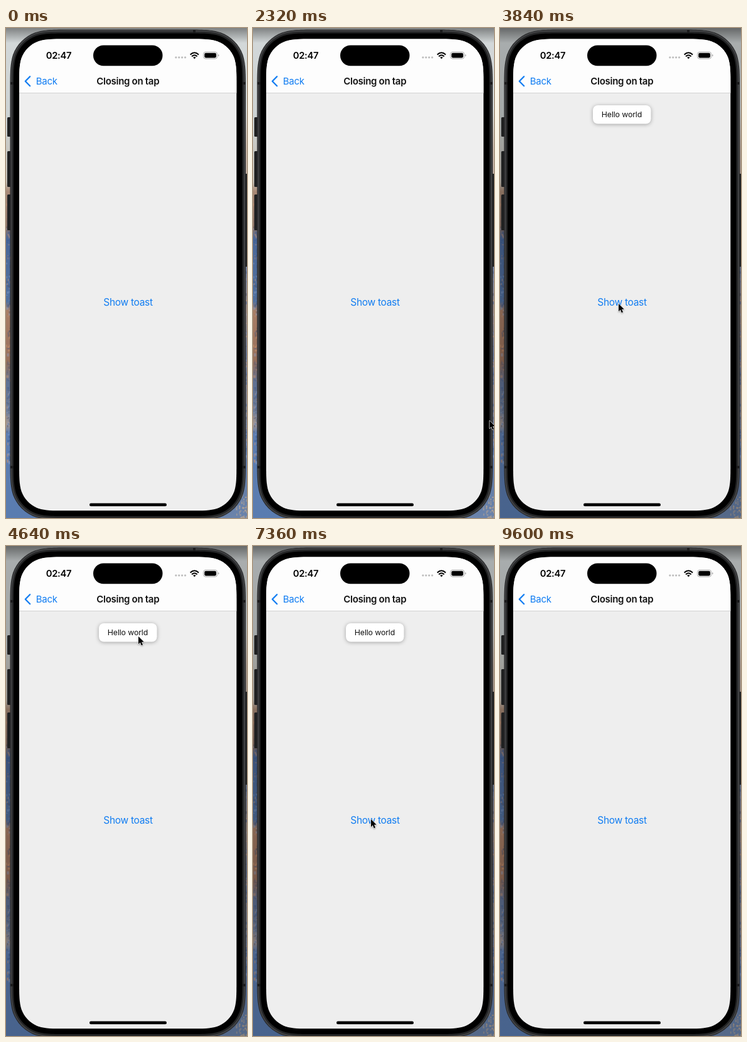
An HTML page with a canvas for the animation above (9.68 s loop, 384 by 780 pixels).

```html
<!DOCTYPE html>
<html lang="en">
<head>
<meta charset="utf-8">
<title>Closing on tap</title>
<style>
  html, body { margin: 0; width: 100%; height: 100%; overflow: hidden; background: #5f7fb0; }
  canvas, svg { position: absolute; left: 0; top: 0; display: block; }
  text { font-family: Inter, "Liberation Sans", sans-serif; font-size: 15px; letter-spacing: -.02em; }
  .bold { font-weight: 600; }
  .link { fill: #117df2; }
  .mid { text-anchor: middle; }
  #toast rect { filter: drop-shadow(0 1px 3px rgba(0, 0, 0, .32)); }
  #cursor { filter: drop-shadow(0 1px 1px rgba(0, 0, 0, .35)); }
</style>
</head>
<body>
<canvas id="wall" width="384" height="780"></canvas>
<svg width="384" height="780" viewBox="0 0 384 780">
  <defs>
    <clipPath id="screen"><path id="glass"/></clipPath>
    <linearGradient id="topShade" x2="0" y2="1">
      <stop stop-color="#000" stop-opacity=".4"/>
      <stop offset="1" stop-color="#000" stop-opacity="0"/>
    </linearGradient>
  </defs>

  <rect width="384" height="24" fill="url(#topShade)"/>
  <rect id="focusShade" width="384" height="780" fill="#000" opacity="0"/>

  <!-- phone body -->
  <g fill="#202122">
    <rect x="2" y="142" width="8" height="31" rx="1.5"/>
    <rect x="2" y="196" width="8" height="57" rx="1.5"/>
    <rect x="2" y="265" width="8" height="57" rx="1.5"/>
    <rect x="381" y="232" width="5" height="148" rx="1.5"/>
  </g>
  <path id="body" fill="#242526"/>
  <path id="rim" fill="none" stroke="#424345" stroke-width="2"/>
  <path id="bezel"/>
  <path d="M7 86h5v4h-5zM377 86h5v4h-5zM7 697h5v4h-5zM377 697h5v4h-5zM298 3h4v5h-4z" fill="#1b1b1c"/>

  <g clip-path="url(#screen)">
    <rect x="21" y="17" width="347" height="752" fill="#eee"/>
    <rect x="21" y="17" width="347" height="86" fill="#fdfdfd"/>
    <rect x="21" y="103" width="347" height="1" fill="#d2d2d2"/>

    <path d="M38.2 77.2 30.8 84.7l7.4 7.5" fill="none" stroke="#117df2" stroke-width="2.3" stroke-linecap="round" stroke-linejoin="round"/>
    <text class="link" x="47.8" y="90">Back</text>
    <text class="bold mid" x="194.3" y="89.9" fill="#111">Closing on tap</text>
    <text class="link mid" x="194.5" y="441.8" style="font-size:15.5px">Show toast</text>

    <text class="bold mid" x="84" y="49" style="font-size:14.8px">02:47</text>
    <g fill="#bdbdbd">
      <circle cx="270.8" cy="46.8" r="1.6"/><circle cx="275.7" cy="46.8" r="1.6"/>
      <circle cx="280.6" cy="46.8" r="1.6"/><circle cx="285.5" cy="46.8" r="1.6"/>
    </g>
    <g fill="none" stroke="#000" stroke-width="2">
      <path d="M293.6 42.4q6.7-6.2 13.4 0M296 45.2q4.3-3.9 8.6 0"/>
      <path d="M298 46.8q2.3-1.8 4.6 0l-2.3 2.4z" fill="#000" stroke="none"/>
    </g>
    <rect x="314.6" y="38.2" width="22" height="10.8" rx="3.4" fill="none" stroke="#a8a8a8"/>
    <path d="M338 41.7q1.5.5 1.5 1.9t-1.5 1.9z" fill="#a8a8a8"/>
    <rect x="316.2" y="39.8" width="18.8" height="7.6" rx="2.1"/>

    <g id="toast">
      <rect x="148" y="123" width="92.5" height="29.5" rx="8" fill="#fff"/>
      <text class="mid" x="194" y="142.3" fill="#111" style="font-size:12.3px;letter-spacing:-.01em">Hello world</text>
    </g>

    <rect x="139" y="27.5" width="110.5" height="32.7" rx="16.35"/>
    <rect x="133" y="756.6" width="123" height="4.6" rx="2.3"/>
  </g>

  <path id="cursor" d="M0 0v12.2l2.8-2.6 2 4.7 2.2-1-2-4.5h3.8z" stroke="#fff" stroke-width="1.2" stroke-linejoin="round" paint-order="stroke"/>
</svg>

<script>
  const LOOP = 9680, STEP = 80;
  const byId = id => document.getElementById(id);
  const toast = byId("toast"), cursor = byId("cursor"), focusShade = byId("focusShade");

  const clamp = v => Math.min(1, Math.max(0, v));
  const easeOut = p => 1 - (1 - p) ** 2;
  const easeIn = p => p * p;
  const easeInOut = p => p * p * (3 - 2 * p);

  // Rounded rectangle whose corners flow smoothly into the sides
  function smoothRect(left, top, right, bottom, r) {
    const half = [[1.529, 0], [1.088, 0], [.868, 0], [.631, .075], [.373, .169]];
    const corner = [...half, ...half.map(([a, b]) => [b, a]).reverse()];
    const place = (x, y, sx, sy, points) => points.map(([a, b]) => [x + sx * a * r, y + sy * b * r]);
    const sides = [
      place(left, top, 1, 1, corner.slice().reverse()),
      place(right, top, -1, 1, corner),
      place(right, bottom, -1, -1, corner.slice().reverse()),
      place(left, bottom, 1, -1, corner)
    ];
    return sides.map(([first, ...rest], i) => `${i ? "L" : "M"}${first}C${rest.join(" ")}`).join("") + "Z";
  }

  // Visible spans of the toast: [opens, starts closing, closing duration]
  const toastSpans = [[2880, 4960, 320], [7000, 7720, 240]];
  const HIDDEN = -145;
  // Cursor moves: [start, end, x, y]
  const start = [392, 640];
  const moves = [
    [2240, 2720, 189, 439],
    [3840, 4480, 211, 144],
    [6320, 6880, 188, 435],
    [7360, 7680, 211, 144],
    [9040, 9440, 400, 260]
  ];

  function toastOffset(t) {
    const span = toastSpans.find(([open, close, fade]) => t >= open && t < close + fade);
    if (!span) return HIDDEN - 15;
    const [open, close, fade] = span;
    return t < close ? HIDDEN * (1 - easeOut(clamp((t - open) / 320)))
                     : HIDDEN * easeIn((t - close) / fade);
  }

  function cursorAt(t) {
    let [x, y] = start;
    for (const [from, to, nextX, nextY] of moves) {
      const p = easeInOut(clamp((t - from) / (to - from)));
      x += (nextX - x) * p;
      y += (nextY - y) * p;
    }
    return [x, y];
  }

  function paintWall() {
    const ctx = byId("wall").getContext("2d");
    const side = (x, stops) => {
      const fill = ctx.createLinearGradient(0, 0, 0, 780);
      stops.forEach(([y, color]) => fill.addColorStop(y / 780, color));
      ctx.fillStyle = fill;
      ctx.fillRect(x, 0, 192, 780);
    };
    side(0, [[0, "#d3d8d9"], [140, "#cdd3d3"], [245, "#c3bdb3"], [260, "#a98a76"], [318, "#8d7468"],
      [335, "#4a6798"], [435, "#50709f"], [450, "#a87e66"], [530, "#98705a"], [565, "#5f7193"],
      [610, "#6d7c98"], [630, "#a5968f"], [645, "#5d7db0"], [780, "#5a7cb0"]]);
    side(192, [[0, "#d3d8d9"], [130, "#d2d6d5"], [190, "#c4b3a6"], [235, "#b9a99f"], [385, "#74809a"],
      [450, "#93847f"], [520, "#68738d"], [600, "#7f808a"], [680, "#5f78a2"], [780, "#6a83ab"]]);

    let seed = 11;
    const rand = () => (seed = seed * 16807 % 2147483647) / 2147483647;
    const paints = ["#d29a70", "#35558c", "#8ca6cf", "#54556a"];
    ctx.globalAlpha = .4;
    for (let i = 0; i < 420; i++) {
      const x = rand() < .5 ? rand() * 9 : 375 + rand() * 9;
      ctx.fillStyle = paints[Math.floor(rand() * paints.length)];
      ctx.fillRect(x, 270 + rand() * 420, 1 + rand() * 3, 1 + rand() * 4);
    }
    ctx.fillStyle = "#d6b48c";
    for (let i = 0; i < 60; i++) {
      ctx.fillRect(366 + rand() * 18, 742 + rand() * 38, 1 + rand() * 2, 1 + rand() * 3);
    }
  }

  function shapePhone() {
    const shape = (id, ...box) => byId(id).setAttribute("d", smoothRect(...box));
    shape("body", 6.5, 2.5, 382, 783, 63);
    shape("rim", 8.5, 4.5, 380, 781, 61);
    shape("bezel", 12, 8.5, 376.5, 777, 57);
    shape("glass", 21, 17.5, 367.3, 768.3, 48.4);
  }

  function draw(now) {
    const t = Math.floor(now % LOOP / STEP) * STEP;
    toast.setAttribute("transform", `translate(0 ${toastOffset(t)})`);
    cursor.setAttribute("transform", `translate(${cursorAt(t)})`);
    focusShade.setAttribute("opacity", t >= 2720 ? .2 : 0);
    requestAnimationFrame(draw);
  }

  paintWall();
  shapePhone();
  draw(performance.now());
</script>
</body>
</html>
```
